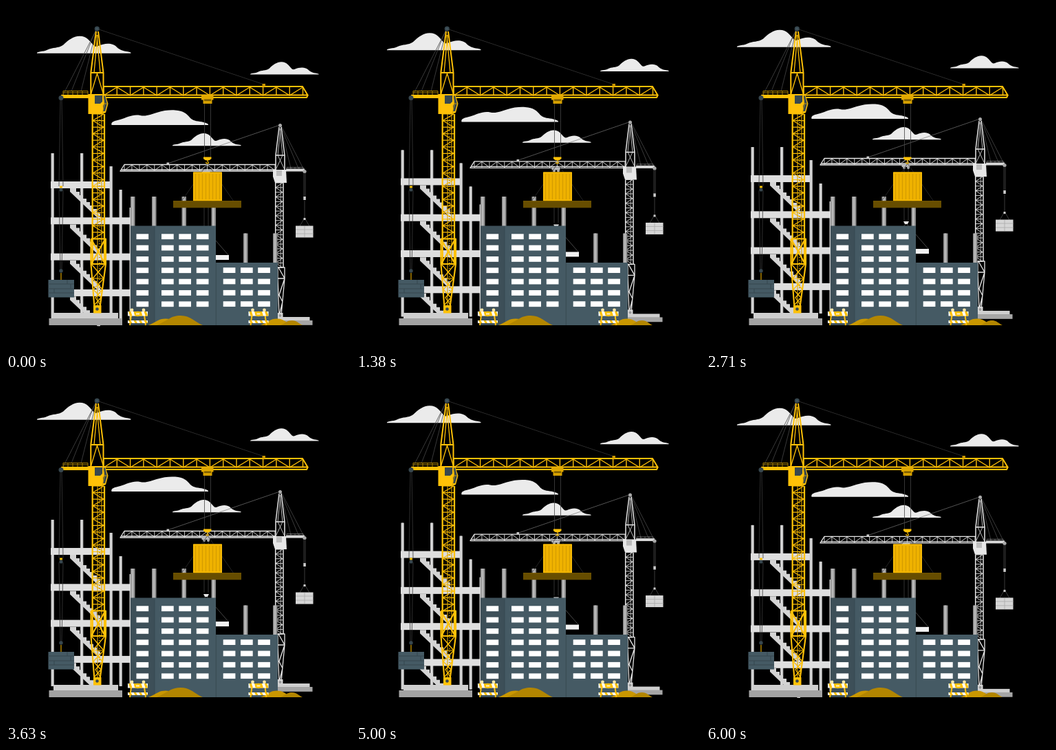
An HTML page for the animation above (6.04 s loop, 500x500 px).

```html
<!DOCTYPE html>
<html>
<head>
<meta charset="utf-8">
<style>
html, body { margin: 0; width: 100%; height: 100%; overflow: hidden; background: #000; }
svg { display: block; width: 100vw; height: 100vh; }
</style>
</head>
<body>
<svg viewBox="0 0 500 500"><g id="back"></g><g id="front"></g></svg>
<script>
const GOLD = '#ffc107', PALE = '#e6e6e6', DARK = '#37474f', SLATE = '#455a64', WIRE = '#555';
const LOOP = 6040, LIFT = 10;

const rect = (x, y, w, h, c) => `<rect x="${x}" y="${y}" width="${w}" height="${h}" fill="${c}"/>`;
const fill = (d, c) => `<path d="${d}" fill="${c}"/>`;
const line = (d, c, w = 1) => `<path d="${d}" fill="none" stroke="${c}" stroke-width="${w}" stroke-linejoin="round"/>`;
const dot = (x, y, r, c) => `<circle cx="${x}" cy="${y}" r="${r}" fill="${c}"/>`;
const list = (n, f) => Array.from({ length: n }, (_, i) => f(i)).join('');

// Zigzag lattice with cross bars, along x or y
function lattice(x, y, step, n, size, c, w, upright) {
  const at = (i, far) => upright ? `${x + far * size} ${y + i * step}` : `${x + i * step} ${y + far * size}`;
  const zig = 'M' + at(0, 1) + list(n, i => 'L' + at(i + 1, i % 2));
  const bars = list(n + 1, i => `M${at(i, 0)}L${at(i, 1)}`);
  return line(zig, c, w) + line(bars, c, w);
}

function cloud(x, base, s) {
  const d = 'M0 0C-1-3 9-2 15-5C23-9 31-7 38-12C45-19 53-25 62-25C73-25 77-17 83-11' +
    'C86-8 91-12 96-13C103-15 112-14 116-9C121-4 128-3 134-2Q138-1 136 0Z';
  return `<path transform="translate(${x} ${base}) scale(${s})" d="${d}" fill="#ebebeb"/>`;
}

function stairs(y) {
  const steps = list(8, i => `H${102 + i * 5}V${y + 5 + i * 5}`);
  return fill(`M93 ${y}${steps}V${y + 43}H133L93 ${y + 5}Z`, '#d4d4d4');
}

function post(x, y, h) {
  return rect(x, y, 6.5, h, '#8c8c8c') + rect(x + 1.5, y, 3, h, '#b8b8b8');
}

function scaffold() {
  const columns = [[65.5, 214], [108, 214], [150.5, 233], [164.5, 267], [179.5, 293]];
  return columns.map(([x, y]) => rect(x, y, 4.3, 456 - y, '#c4c4c4') + rect(x + 1.2, y, 1.8, 456 - y, '#d8d8d8')).join('') +
    list(4, i => stairs(265 + i * 52.4)) +
    list(4, i => rect(65, 255 + i * 52.3, i ? 116 : 86, 10, '#dedede'));
}

function paleCrane() {
  return line('M398 173L235 229', '#777', .7) +
    line('M399 174L414 236M399 174L425 236M400 174L434 240', WIRE, .7) +
    line('M288 241L288 320M294 241L294 320', '#4a4a4a', .7) +
    line('M291 325L324 363M291 325L258 363', '#666', .7) +
    fill('M287 322h8l-2 4h-4z', PALE) + rect(258, 362, 66, 7, '#f2f2f2') +
    lattice(172, 231, 10.95, 20, 8, PALE, .9) +
    line('M392 230.5H172L166 240H392M168 238H392', PALE, 1.3) +
    rect(233.5, 227.5, 3.5, 3, '#ccc') +
    rect(284.5, 239, 12, 4, '#bbb') + dot(288, 244, 2, '#aaa') + dot(294, 244, 2, '#aaa') +
    line('M397 176L392 217V239M400 176L405 217V239M392 217H405', PALE, 1.5) +
    line('M399 178L395 217L405 238M398 178L402 217L392 238', PALE, .8) +
    dot(398.5, 173.5, 2.5, '#aaa') +
    lattice(392, 257, 6.85, 18, 10, PALE, .9, true) +
    line('M391.7 257V380M403 257V380', PALE, 1.5) + line('M399.5 257V380', '#bbb', .8) +
    line('M395 380H405V396L400 450M395 380V396L397 450M395 396H405M396 380L405 396L397 420L402 430L398 446', PALE, 1.3) +
    rect(407, 236.5, 27, 4, '#d8d8d8') +
    line('M408 237V234.5H432V237M414 234V237M420 234V237M426 234V237', '#888', .7) +
    fill('M388 238H407L408 257H391L388 248Z', PALE) + rect(393, 239, 8, 8, '#bdbdbd') +
    dot(434, 240.5, 2.6, '#aaa') +
    line('M433 242L433 278M435 242L435 278M434 283V310M434 308L427 320M434 308L441 320', WIRE, .7) +
    rect(432.3, 277, 3.5, 5, '#ccc') + rect(432.5, 308, 3, 3, '#ccc') +
    rect(421, 319.5, 25.5, 17, '#d6d6d6') + line('M421 325H446.5M421 331H446.5M434 320V336', '#aaa', .8) +
    rect(392, 452, 49.5, 5.5, '#cfcfcf') + rect(380, 457, 65.5, 6.8, '#a6a6a6') +
    rect(394.5, 446, 8, 7, '#d6d6d6') + dot(398.5, 450, 2, '#999');
}

function building() {
  const panes = (xs, y, n) => xs.map(x => list(n, i => rect(x, y + i * 16.35, 17.7, 7.8, '#fff'))).join('');
  return [181, 212, 255.5, 298.5].map(x => post(x, 277, 43)).join('') +
    post(345, 330.5, 43) + post(388, 330.5, 43) +
    rect(305, 373, 90, 91, SLATE) + rect(216, 319.5, 89, 144.5, SLATE) + rect(181, 319.5, 35, 144.5, '#3d4f58') +
    line('M216 320V464M305.3 373V464', DARK, .8) +
    panes([189.5], 331.3, 7) + panes([226, 251.3, 276.8], 331.3, 7) + panes([315.7, 341, 366.2], 380.2, 4);
}

function goldCrane() {
  return line('M132 33L375 114', '#3c3c3c', .7) +
    line('M131 35L82 131M130 36L95 124M131 36L109 124', '#4a4a4a', .8) +
    line('M79 136L77 262M81 136L83 262M77 268L79 383M83 268L81 383', '#3a3a3a', .8) +
    rect(78, 261.5, 4, 3, GOLD) + dot(80, 267, 2.6, DARK) + dot(80, 385, 2.7, DARK) +
    line('M80 388V398', '#c99700', 1.3) +
    rect(61.5, 398, 37.5, 25.5, SLATE) +
    line('M61.5 404H99M61.5 411H99M61.5 417H99M89 398V404M94 404V411M70 411V417', DARK, 1) +
    lattice(126, 157, 9.55, 19, 16, GOLD, 1.2, true) +
    line('M125.7 157V375M143 157V375', GOLD, 2.3) +
    line('M133 157V435M139 157V375', '#dba500', 1.1) +
    line('M136 157V435', '#b88a00', 2.2).replace('/>', ' stroke-dasharray="1 3"/>') +
    line('M123.5 338.5H145V375L136.5 438M123.5 338.5V375L128.5 438M123.5 375H145M124 339L144 375M144 339L124 375', GOLD, 2.1) +
    line('M124 375L142 396L127 412L138 424L129 434M144 375L126 396L140 412L130 424L137 434M126 396H142', GOLD, 1.2) +
    rect(127, 435, 11.5, 11.5, GOLD) + dot(132.5, 440.5, 2.3, DARK) +
    lattice(142, 118, 19.3, 15, 12, GOLD, 1.4) +
    line('M142 117H431L438.5 129.5H142M142 133H437L439 129', GOLD, 2) +
    rect(372.5, 113, 4.5, 4, '#c99700') +
    line('M131 37L123.3 97V128M134 37L141.5 97V128M123 97H142', GOLD, 2) +
    line('M133 42L128 97M132 42L137 97M123.5 128L132.5 98L141.5 128', GOLD, 1.3) +
    dot(132.3, 33, 3.6, DARK) + dot(132.3, 33, 1.3, SLATE) +
    rect(80, 129, 41, 5, GOLD) +
    line('M83 129V123.5H119V129M83 126H119' + list(4, i => `M${90 + i * 7} 123.5V129`), '#b38800', .9) +
    dot(80, 133.5, 3.5, DARK) +
    fill('M119.5 128H144L148.5 142L145 155L140 157H119.5Z', GOLD) +
    fill('M129 130H140V139L137 142H129Z', DARK) +
    fill('M142 130.5H144L147 142L144 153H141V145L143 141Z', DARK) +
    line('M140 128L143 142L140 157M143 142H148', '#d9a400', .9);
}

function load() {
  return line('M288.5 141V220M297.5 141V220', '#444', .8) +
    rect(284, 129.5, 17.5, 7, '#e0a800') + rect(286.5, 136, 13, 6, '#d39e00') + rect(288, 135.5, 10, 2.5, '#7a5c00') +
    line('M293 229L255 284M293 229L331 284', '#333', .7) +
    fill('M287 219.5H298.5V222Q296 224.5 293 224.5Q289 224.5 287 222Z', GOLD) +
    line('M293 224V226Q296 228 293 229Q291 229 290.5 227', '#d9a400', 1.4) +
    rect(272, 241.5, 42, 42, '#efb200') +
    line(list(8, i => `M${275.5 + i * 5} 244V281`), '#d39b00', 1.1) +
    line('M272.5 242H313.5V283H272.5Z', '#ffc107', 1) +
    rect(243, 283.3, 99, 10, '#664d00') + line('M243 283.7H342', '#806000', .8);
}

function barrier(x) {
  const board = (y, h) => rect(x, y, 29, h, '#fff') +
    list(4, i => fill(`M${x + 1 + i * 7.5} ${y}h3.5l2 ${h}h-3.5z`, GOLD));
  return line(`M${x + 6} 442L${x + 3} 464M${x + 23} 442L${x + 26} 464`, GOLD, 2) +
    board(444, 6.5) + board(457, 4) +
    dot(x + 6, 442, 2.4, '#ffe9a8') + dot(x + 23, 442, 2.4, '#ffe9a8') +
    `<ellipse cx="${x + 14.5}" cy="447.5" rx="5" ry="3.8" fill="${GOLD}"/>` + rect(x + 12, 446.5, 5, 2, '#fff3cd');
}

const mound = (x, w, h, c) => fill(`M${x} 464C${x + w * .25} ${464 - h * .5} ${x + w * .3} ${464 - h} ${x + w * .52} ${464 - h}` +
  `S${x + w * .82} ${464 - h * .35} ${x + w} 464Z`, c);

const back = document.getElementById('back');
back.innerHTML = cloud(45, 68.8, 1) + cloud(355, 99.6, .73) + cloud(242, 203.2, .73) +
  fill('M153.500 173C152 168 158 167 166 165C176 162 184 157 195 159C204 161 211 157 219 155' +
    'C229 152 237 151 246 151.500C258 152 263 157 268 163C273 168 280 167 287 169Q295 171 294 173Z', '#ebebeb') +
  scaffold() + paleCrane();

document.getElementById('front').innerHTML = building() +
  rect(69, 446, 94, 8, '#cfcfcf') + rect(62.5, 454, 106.500, 10, '#a3a3a3') +
  goldCrane() + load() +
  mound(207, 48, 9.5, '#c99700') + mound(219, 67, 14, '#b38600') +
  mound(370, 46, 9.5, '#c99700') + mound(399, 32, 7, '#b38600') +
  barrier(177) + barrier(352.5);

function frame(now) {
  const p = now % LOOP / LOOP;
  const y = -LIFT * (1 - Math.abs(1 - 2 * p));
  back.setAttribute('transform', `translate(0 ${y.toFixed(3)})`);
  requestAnimationFrame(frame);
}
frame(performance.now());
</script>
</body>
</html>
```
